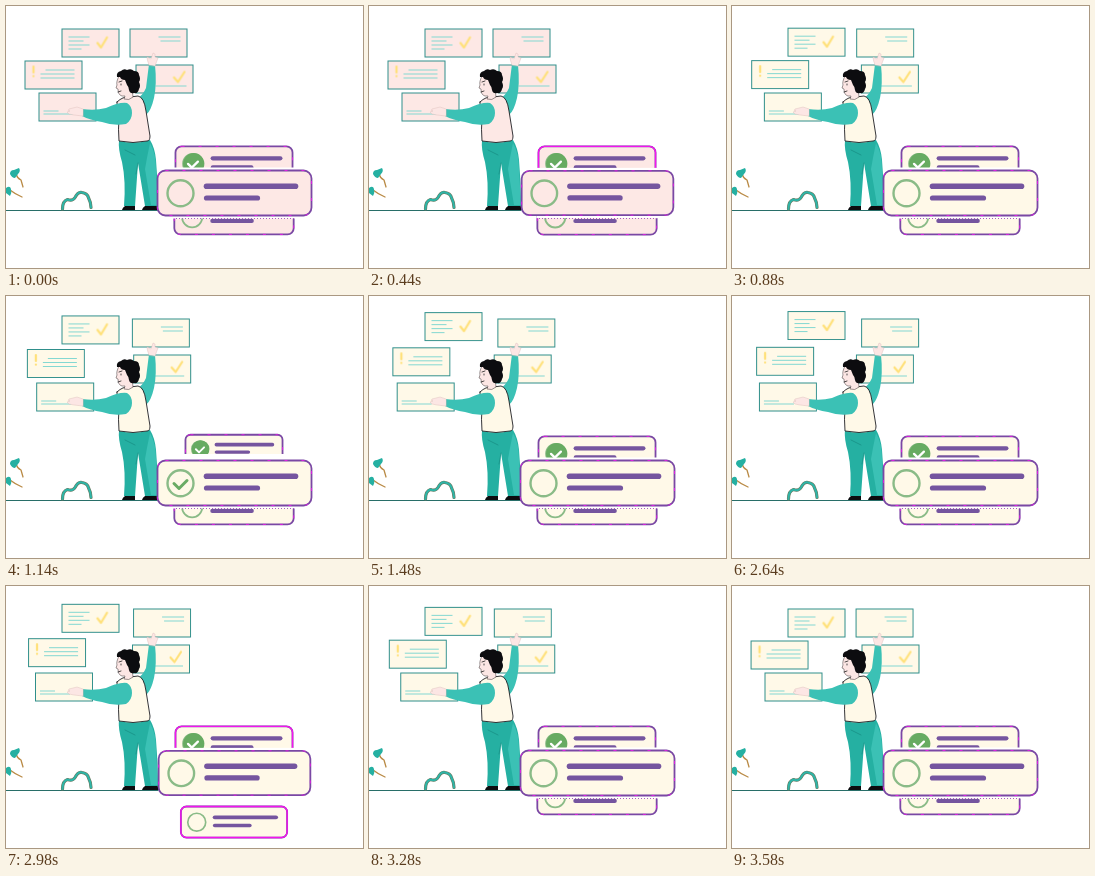
An HTML page for the animation above (3600 ms loop, 357 px wide and 262 px high).

```html
<!DOCTYPE html>
<html lang="en">
<head>
<meta charset="utf-8">
<title>Task board</title>
<style>
html, body { margin: 0; width: 100%; height: 100%; overflow: hidden; background: #fff; }
svg { display: block; width: 357px; height: 262px; animation: paper 3600ms step-end infinite; }
path { fill: none; stroke-linecap: round; stroke-linejoin: round; }

/* every paper surface inherits its tint from the stage */
.paper { fill: currentColor; }
@keyframes paper {
  0% { color: #fde8e5; }
  19.4% { color: #fff9e8; }
  41.7% { color: #fff; }
  63.9% { color: #fff9e8; }
}

.card { animation: drift 3600ms infinite; }
.card rect { stroke: #2f8f8b; stroke-width: 1; shape-rendering: crispEdges; }
.card .lines { stroke: #84d8d2; stroke-width: 1; stroke-linecap: butt; shape-rendering: crispEdges; }
.card .mark { stroke: #ffe17a; stroke-width: 2.2; }
@keyframes drift {
  0%, 17.2% { transform: none; animation-timing-function: cubic-bezier(.37, 0, .63, 1); }
  51.1%, 68% { transform: translate(var(--dx), var(--dy)); animation-timing-function: cubic-bezier(.37, 0, .66, .96); }
  100% { transform: none; }
}

.teal { fill: #3bc1b5; }
.cloth { fill: #25b0a2; }
.skin { fill: #fce6e4; }
.ink { fill: #0c0c0f; }

.gap { fill: #fff; }
.edge { stroke: #7a48a4; stroke-width: 1.8; vector-effect: non-scaling-stroke; }
.glow { fill: none; stroke: #f414ee; vector-effect: non-scaling-stroke; }
.bars { stroke: #75559f; }
.ring { fill: none; stroke: #8abb87; stroke-width: 2.4; }
.disc { fill: #67ab61; }
.tick { stroke: #6aab64; stroke-width: 3; stroke-dasharray: 1 2; }
#seam { stroke: #a85cc4; stroke-dasharray: 1 2; stroke-linecap: butt; }
</style>
</head>
<body>
<svg viewBox="0 0 357 262">
  <defs>
    <clipPath id="above"><rect width="357" height="158"/></clipPath>
  </defs>

  <g id="cards"></g>

  <g id="ground">
    <path d="M0 204.5H152" stroke="#286e68"/>
    <path d="M10 168q1 4 5 6l2 7M4 184q5 4 12 7" stroke="#b98a45" stroke-width="1.3"/>
    <path class="cloth" d="M4 168q0-4 4-4l5-2q2 3-1 6l-3 4q-3 0-5-4zM0 182q4-3 5 1t-1 7l-4-3z"/>
    <path id="coil" d="M56.500 203q0-8 5-9.500 5 2 7.500-2 3-6 7-5 5 1 6 4 3 6 3 11" stroke="#6c7a60" stroke-width="3.200"/>
    <use href="#coil" style="display:none"/>
    <path d="M56.500 203q0-8 5-9.500 5 2 7.500-2 3-6 7-5 5 1 6 4 3 6 3 11" stroke="#2db5a8" stroke-width="2"/>
  </g>

  <g id="person">
    <path class="ink" d="M116 204q1-4 6-5h7v5zM136 204q1-4 6-5l9-1 2 6z"/>
    <path class="cloth" d="M113 134h31q5 8 6 20 2 22 2 46h-13l-7-43-3 43h-11q2-25-2-44-4-13-3-22z"/>
    <path class="teal" d="M144 137q6 10 6 26l2 36h-7l-6-36q2-12 5-26z"/>
    <path d="M119 144l10 5M132 157l-2 11" stroke="#178d83" stroke-width=".7"/>
    <path class="teal" d="M143 58l6 1q2 19-1 33-3 13-8 17l-9-16q6-4 9-11z"/>
    <path class="skin" d="M143 59q-2-5-2-8l4 2 2-6 2 1 0 3 3 1-3 8z" stroke="#d9b9b7" stroke-width=".4"/>
    <path class="paper" d="M111 96q6-6 13-5l8-1q6 1 8 15l4 25q0 5-3 5-14 3-28 0-1-12 0-23-3-9-2-16z" stroke="#202024" stroke-width=".9"/>
    <path class="teal" d="M76 103q13 2 24-1 13-6 21-5 5 3 5 10t-6 11q-13 2-24-2-12-2-20-6z"/>
    <path class="skin" d="M77 103l-6-2-8 2q-2 2 1 2l-3 1 2 2 5 1 9 1z" stroke="#d9b9b7" stroke-width=".4"/>
    <path class="skin" d="M113 70q-3 6-2 9l-1 3 2 1q0 6 4 7l3 0-1 3q5 2 9-2l-2-18-5-5z" stroke="#3a3033" stroke-width=".5"/>
    <path d="M113 76l3-1M115 78v1M112 86l3-1" stroke="#222" stroke-width=".8"/>
    <path class="ink" d="M111 71q-1-5 4-6 3-3 6-1 4-2 7 1 5 0 5 4 2 4 0 7 2 4 0 7-1 5-5 4-4 1-5-3 0-3-2-5l-2-5q-4 0-5-3z"/>
  </g>

  <g id="stack"></g>
  <path id="seam" d="M170 212.500H288"/>
</svg>

<script>
const LOOP = 3600, CYCLE = 860;
const $ = id => document.getElementById(id);

// x, y, drift x, drift y, text lines, yellow mark
const cards = [
  [55.5, 22.5, 0, -8, 'M7 8h21M7 12h15M7 16h21M7 20h13', 'M36 14.5l3.5 4.500 6-10'],
  [123.5, 22.5, 6, 0, 'M29 8h22M31 12h20', ''],
  [18.5, 54.5, 6, -4, 'M21 9h29M16 13h34M16 17h34', 'M9 6v6M9 15.500v.2'],
  [32.5, 86.5, -6, 0, 'M5 18h15M5 21h30', ''],
  [129.5, 58.5, -6, 0, 'M20 21h31', 'M38.500 13l4 4.500 6.500-10'],
];
$('cards').innerHTML = cards.map(([x, y, dx, dy, lines, mark]) => `
  <g transform="translate(${x} ${y})"><g class="card" style="--dx:${dx}px;--dy:${dy}px">
    <rect class="paper" width="57" height="28"/>
    <path class="lines" d="${lines}"/><path class="mark" d="${mark}"/>
  </g></g>`).join('');

const frame = 'x="-77" y="-22.5" width="154" height="45" rx="8"';
const panel = id => `<g id="${id}">
  <rect class="gap" x="-62" y="-25.5" width="124" height="51"/>
  <rect class="paper edge" ${frame}/><rect class="glow" ${frame}/>
  <circle class="ring" cx="-54" cy=".3" r="13"/>
  <circle class="disc" cx="-53" cy=".3" r="14"/>
  <path class="tick" pathLength="1" d="M-60.5 .5l5 5 8-8"/>
  <path class="bars" stroke-width="5.6" d="M-28-6.8H61"/>
  <path class="bars" stroke-width="5.2" d="M-28 5H23"/>
</g>`;
$('stack').innerHTML = `<g id="exit">${panel('old')}</g>` + ['next', 'low', 'main'].map(panel).join('');

// centre x, centre y, scale
const slots = {
  below: [228, 250, .12], pop: [228, 236, .69], bottom: [228, 211, .775],
  front: [228.5, 187, 1], top: [228, 157.5, .76], gone: [228, 143, .35],
};

const ramp = (p, a, b) => Math.min(1, Math.max(0, (p - a) / (b - a)));
const smooth = u => u * u * (3 - 2 * u);

function place(id, from, to, k, { tick = 0, fill = 0, glow = false, dip = 1 } = {}) {
  const el = $(id), [x, y, s] = slots[from].map((v, i) => v + (slots[to][i] - v) * k);
  el.setAttribute('transform', `translate(${x} ${y}) scale(${s * dip})`);
  const find = c => el.querySelector(c).style;
  find('.disc').opacity = fill;
  const t = find('.tick');
  t.visibility = tick > 0 ? 'visible' : 'hidden';
  t.strokeDashoffset = 1 - tick;
  t.stroke = fill > .5 ? '#fff' : '';
  const g = find('.glow');
  g.strokeDasharray = glow ? 'none' : '3 14';
  g.strokeWidth = glow ? 1.4 : .8;
}

let swapped = false;
function draw(time) {
  const p = time % LOOP % CYCLE;
  const move = smooth(ramp(p, 288, 392));
  const leave = ramp(p, 250, 330);
  const glow = p > 290 && p < 560;
  const tick = ramp(p, 190, 265) ** 2;

  place('old', 'top', 'gone', smooth(leave), { tick: 1, fill: 1, glow });
  $('exit').style.opacity = 1 - ramp(p, 290, 330);
  $('exit').setAttribute('clip-path', leave > 0 ? 'url(#above)' : 'none');

  place('main', 'front', 'top', move, { tick, fill: ramp(move, .2, .6), glow: glow && move > .5 });
  place('low', 'bottom', 'front', move, { dip: 1 - .015 * move * (1 - ramp(p, 440, 600)) });

  // the newcomer grows first, then slides up into the bottom slot
  if (p < 400) place('next', 'below', 'pop', ramp(p, 355, 400), { glow });
  else place('next', 'pop', 'bottom', smooth(ramp(p, 400, 442)), { glow: glow && p < 435 });
  $('next').style.visibility = p > 355 ? 'visible' : 'hidden';
  $('seam').style.visibility = p < 288 || p > 435 ? 'visible' : 'hidden';

  const swap = move > .5;
  if (swap !== swapped) {
    $('stack').append($(swap ? 'low' : 'main'));
    swapped = swap;
  }
}

let start;
function step(now) {
  start ??= now;
  draw(now - start);
  requestAnimationFrame(step);
}
draw(0);
requestAnimationFrame(step);
</script>
</body>
</html>
```
